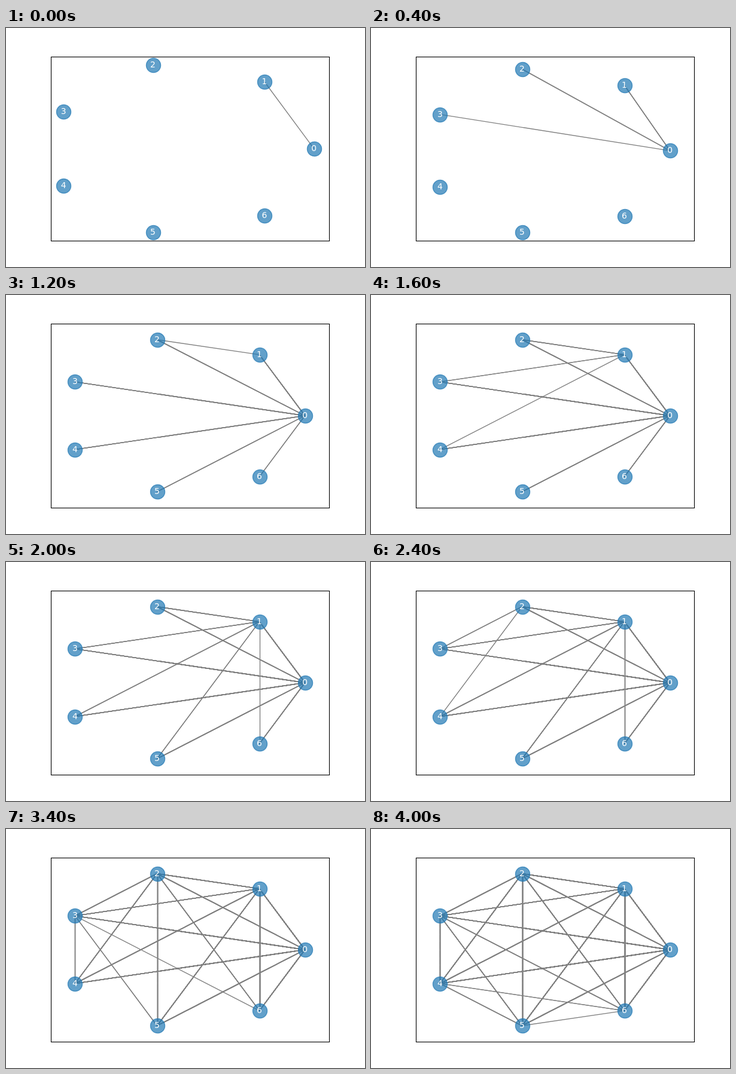
An HTML page that plays this animation: 600 px wide and 400 px high, repeating every 4.2 s.

```html
<!DOCTYPE html>
<html lang="en">
<head>
<meta charset="utf-8">
<title>Complete graph</title>
<style>
  html, body { margin: 0; width: 100%; height: 100%; overflow: hidden; background: #fff; }
  svg { display: block; width: 600px; height: 400px; }
  .edges path { fill: none; stroke: #808080; stroke-width: 1.389; }
  .nodes circle {
    fill: #1f77b4; fill-opacity: .7;
    stroke: #1f77b4; stroke-opacity: .7; stroke-width: 1.389;
  }
  .labels text {
    font: 13.89px "DejaVu Sans", sans-serif;
    fill: #fff; text-anchor: middle;
  }
  .frame { fill: none; stroke: #000; stroke-width: 1.11; }
</style>
</head>
<body>
<svg viewBox="0 0 600 400">
  <g class="edges"></g>
  <g class="nodes"></g>
  <rect class="frame" x="75.5" y="48.5" width="465" height="308"/>
  <g class="labels"></g>
</svg>
<script>
const COUNT = 7, STEP = 200;
const BOX = { left: 75, bottom: 356, width: 465, height: 308 };

const nodes = Array.from({ length: COUNT }, (_, i) => {
  const a = 2 * Math.PI * i / COUNT;
  return { x: Math.cos(a), y: Math.sin(a) };
});
const edges = [];
for (let a = 0; a < COUNT; a++)
  for (let b = a + 1; b < COUNT; b++) edges.push([a, b]);

function add(parent, tag, attrs = {}) {
  const el = document.createElementNS("http://www.w3.org/2000/svg", tag);
  for (const key in attrs) el.setAttribute(key, attrs[key]);
  return document.querySelector(parent).appendChild(el);
}

// Every step lays one more pass over all edges so far, so older lines get heavier.
const passes = edges.map(() => add(".edges", "path"));
const circles = nodes.map(() => add(".nodes", "circle", { r: 12.03 }));
const labels = nodes.map((_, i) => {
  const el = add(".labels", "text");
  el.textContent = i;
  return el;
});

const snap = v => Math.floor(v + 0.5) + 0.5;

function extent(list, key, pad) {
  const vals = list.map(p => p[key]);
  const lo = Math.min(...vals), hi = Math.max(...vals);
  const m = (hi - lo) * pad;
  return [lo - m, hi + m];
}

// Axis limits: all nodes, joined with the padded box of the edges, plus a 5% margin.
function limits(key, linked) {
  const n = extent(nodes, key, 0), e = extent(linked, key, 0.05);
  const lo = Math.min(n[0], e[0]), hi = Math.max(n[1], e[1]);
  const m = (hi - lo) * 0.05;
  return { lo: lo - m, span: hi - lo + 2 * m };
}

function segment(p, q) {
  const upright = Math.abs(p.x - q.x) < 0.01;
  const at = upright ? v => `${snap(v.x)} ${snap(v.y)}` : v => `${v.x} ${v.y}`;
  return `M${at(p)}L${at(q)}`;
}

function draw(step) {
  const linked = edges.slice(0, step + 1).flat().map(i => nodes[i]);
  const lx = limits("x", linked), ly = limits("y", linked);
  const pts = nodes.map(n => ({
    x: BOX.left + (n.x - lx.lo) / lx.span * BOX.width,
    y: BOX.bottom - (n.y - ly.lo) / ly.span * BOX.height
  }));

  let d = "";
  passes.forEach((path, k) => {
    if (k <= step) d += segment(pts[edges[k][0]], pts[edges[k][1]]);
    path.setAttribute("d", k <= step ? d : "");
  });
  pts.forEach((p, i) => {
    circles[i].setAttribute("cx", snap(p.x));
    circles[i].setAttribute("cy", snap(p.y));
    labels[i].setAttribute("x", p.x);
    labels[i].setAttribute("y", Math.round(p.y + 4));
  });
}

let shown = -1;
const start = performance.now();
function tick() {
  const step = Math.floor((performance.now() - start) / STEP) % edges.length;
  if (step !== shown) draw(shown = step);
  requestAnimationFrame(tick);
}
tick();
</script>
</body>
</html>
```
